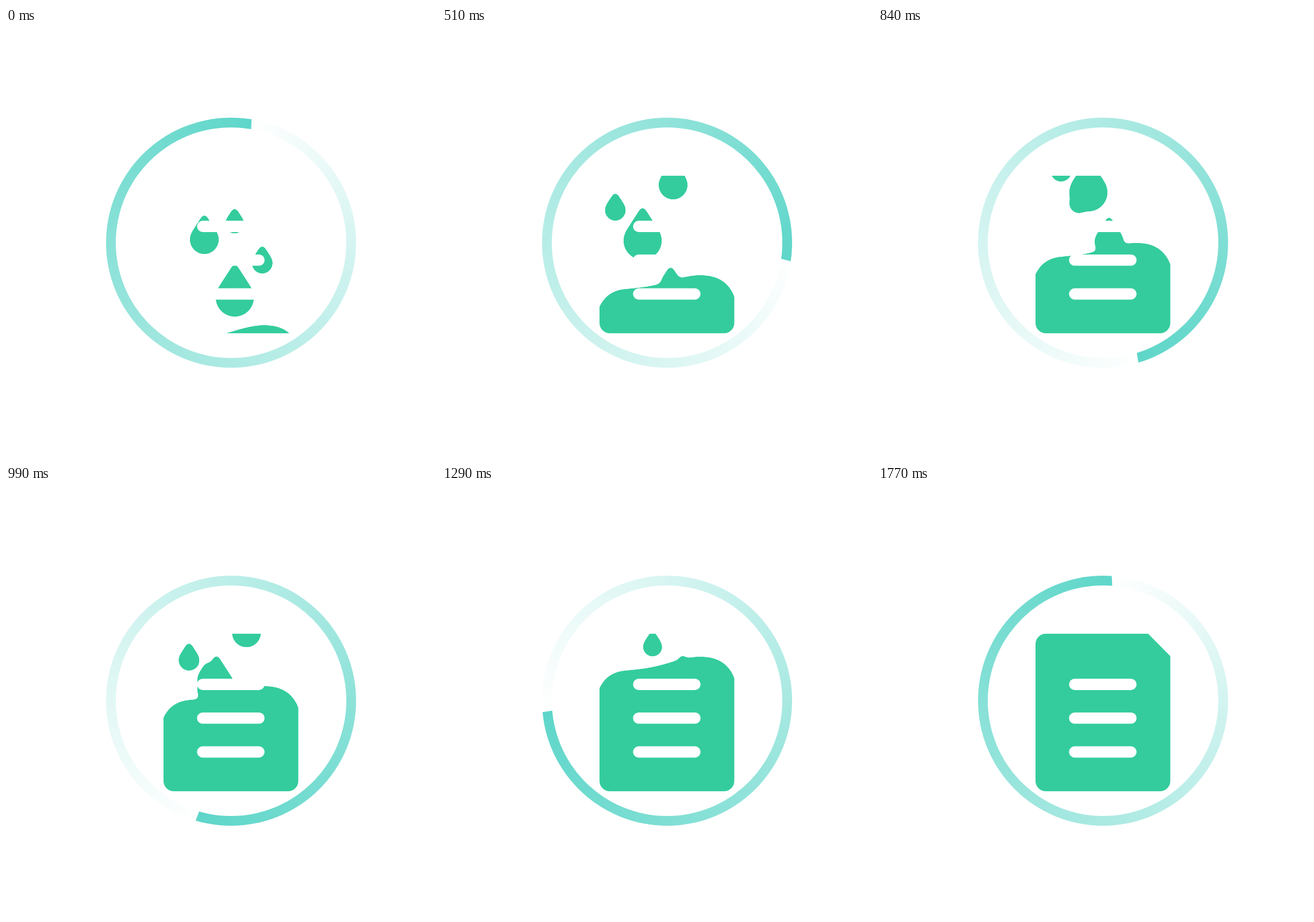
Animation, 748 px wide and 748 px high, one loop 1800 ms. Source, as an HTML page without scripts:

```html
<!DOCTYPE html>
<html lang="en">
<head>
<meta charset="utf-8">
<title>Filling document loader</title>
<style>
  html, body {
    margin: 0;
    width: 100%;
    height: 100%;
    overflow: hidden;
    background: #fff;
  }
  .sweep, .wave, .drop {
    animation: 1800ms steps(60) -2ms infinite;
  }

  .ring {
    position: absolute;
    left: 174px;
    top: 156.3px;
    width: 435px;
    height: 435px;
    border-radius: 50%;
    overflow: hidden;
  }
  .ring::after {
    content: "";
    position: absolute;
    inset: 17px;
    border-radius: 50%;
    background: #fff;
  }
  /* the sweep turns around a point beside the ring's centre */
  .sweep {
    position: absolute;
    left: -17.5px;
    top: -61.8px;
    width: 520px;
    height: 520px;
    border-radius: 50%;
    background: conic-gradient(#5ed6c900, #5ed6c9);
    animation-name: turn;
  }
  @keyframes turn {
    from { transform: rotate(3deg); }
    to { transform: rotate(363deg); }
  }

  svg {
    position: absolute;
    left: 0;
    top: 0;
  }
  .wave { animation-name: rise; }
  @keyframes rise {
    from { transform: translateY(517px); }
    to { transform: translateY(210px); }
  }

  /* --x, --y: centre at the start; --v: px per second; --r: radius */
  .drop { animation-name: fall; }
  .big { --r: 33.5; }
  .mid { --r: 25.5; }
  .small { --r: 18.5; }
  .tiny { --r: 17; --v: 200; }
  @keyframes fall {
    from {
      transform: translate(calc(var(--x) * 1px), calc(var(--y) * 1px)) scale(var(--r));
    }
    to {
      transform: translate(calc(var(--x) * 1px), calc((var(--y) + var(--v) * 1.8) * 1px)) scale(var(--r));
    }
  }
</style>
</head>
<body>
<div class="ring"><div class="sweep"></div></div>

<svg width="748" height="748" viewBox="0 0 748 748">
  <defs>
    <clipPath id="doc">
      <path d="M292 257H470L508.5 296V513a18 18 0 0 1-18 18H292a18 18 0 0 1-18-18V275a18 18 0 0 1 18-18z"/>
    </clipPath>
    <filter id="goo" filterUnits="userSpaceOnUse" x="240" y="200" width="300" height="380" color-interpolation-filters="sRGB">
      <feGaussianBlur stdDeviation="5"/>
      <feColorMatrix values="0 0 0 0 .204  0 0 0 0 .8  0 0 0 0 .616  0 0 0 20 -9.5"/>
    </filter>
    <path id="tear" d="M0-1.84L.84-.543A1 1 0 1 1-.84-.543z"/>
    <rect id="bar" x="332.3" width="117.5" height="19.6" rx="9.8"/>
  </defs>

  <g clip-path="url(#doc)">
    <g filter="url(#goo)">
      <path class="wave" d="M266 85C271 46 288 26 320 24C350 21 365 20 400 9C425 2 435 0 450 0C488 0 509 20 514 60V400H266z"/>

      <g class="drop big" style="--x:398;--y:469;--v:400"><use href="#tear"/></g>
      <g class="drop big" style="--x:349;--y:142;--v:447"><use href="#tear"/></g>
      <g class="drop big" style="--x:366;--y:-89.5;--v:447"><use href="#tear"/></g>

      <g class="drop mid" style="--x:345;--y:368;--v:308"><use href="#tear"/></g>
      <g class="drop mid" style="--x:402;--y:120;--v:300"><use href="#tear"/></g>
      <g class="drop mid" style="--x:418.3;--y:-17;--v:275"><use href="#tear"/></g>

      <g class="drop small" style="--x:445.7;--y:409;--v:315"><use href="#tear"/></g>
      <g class="drop small" style="--x:301.5;--y:133.4;--v:360"><use href="#tear"/></g>
      <g class="drop small" style="--x:318.3;--y:-53.4;--v:360"><use href="#tear"/></g>

      <g class="drop tiny" style="--x:397.7;--y:341"><use href="#tear"/></g>
      <g class="drop tiny" style="--x:349.5;--y:137.5"><use href="#tear"/></g>
      <g class="drop tiny" style="--x:366.3;--y:22"><use href="#tear"/></g>
    </g>
    <g fill="#fff">
      <use href="#bar" y="335.3"/>
      <use href="#bar" y="394"/>
      <use href="#bar" y="452.8"/>
    </g>
  </g>
</svg>
</body>
</html>
```
